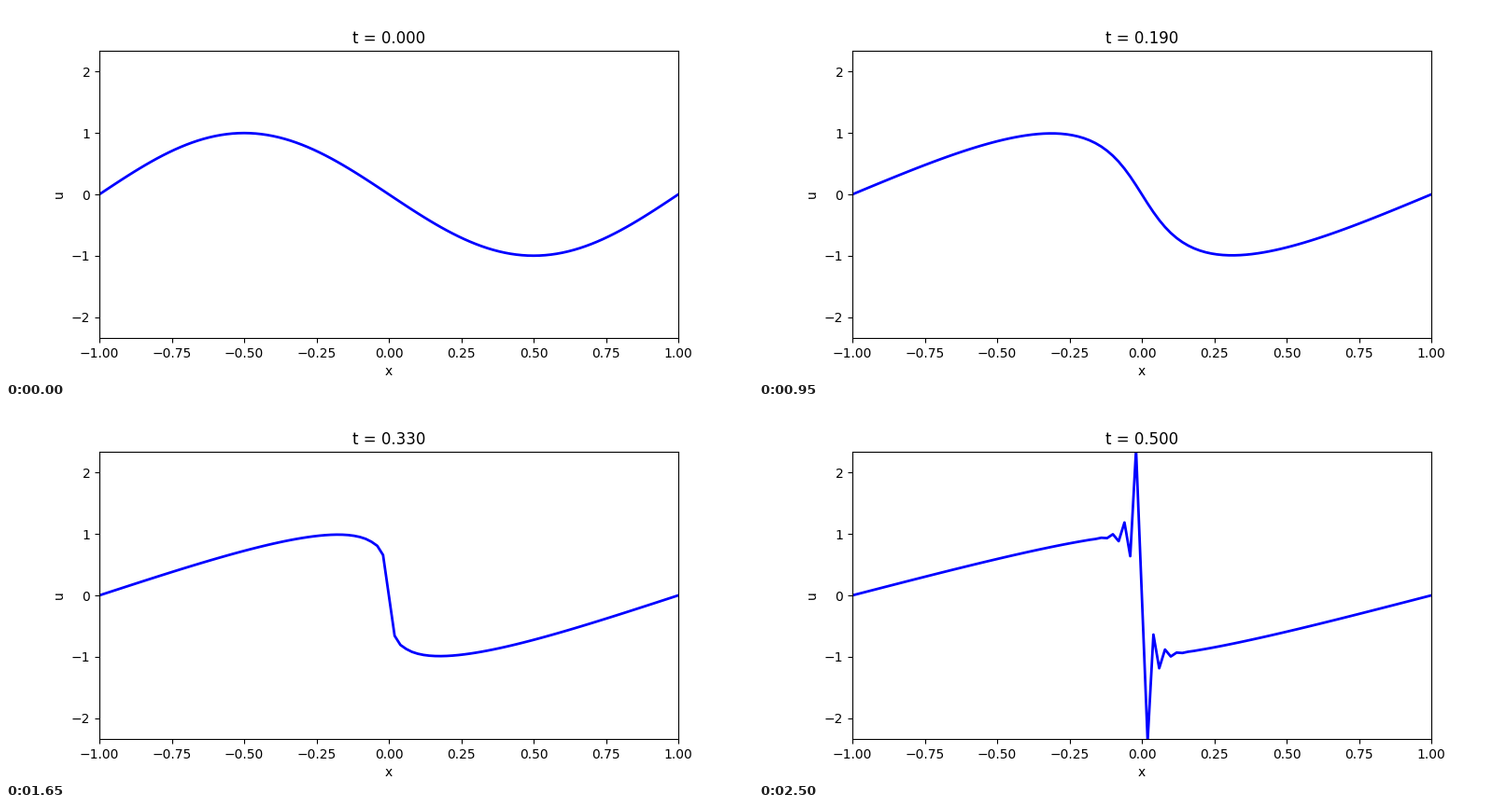
A matplotlib script for the animation above (2.55 s loop, 800 by 400 pixels).

```python
import numpy as np
import matplotlib.pyplot as plt
from matplotlib.animation import FuncAnimation

# Viscous Burgers equation, central differences, fixed zero ends
NU = 0.01 / np.pi
FRAMES = 51
FRAME_DT = 0.01
SUBSTEPS = 10
Y_MAX = 2.342

x = np.linspace(-1, 1, 101)
dx = x[1] - x[0]


def rate(u):
    du = np.zeros_like(u)
    slope = (u[2:] - u[:-2]) / (2 * dx)
    bend = (u[2:] - 2 * u[1:-1] + u[:-2]) / dx**2
    du[1:-1] = NU * bend - u[1:-1] * slope
    return du


def rk4_step(u, h):
    k1 = rate(u)
    k2 = rate(u + h / 2 * k1)
    k3 = rate(u + h / 2 * k2)
    k4 = rate(u + h * k3)
    return u + h / 6 * (k1 + 2 * k2 + 2 * k3 + k4)


def solve():
    u = -np.sin(np.pi * x)
    u[[0, -1]] = 0
    history = [u]
    for _ in range(FRAMES - 1):
        for _ in range(SUBSTEPS):
            u = rk4_step(u, FRAME_DT / SUBSTEPS)
        history.append(u)
    return history


history = solve()

fig, ax = plt.subplots(figsize=(8, 4), dpi=100)
line, = ax.plot(x, history[0], "b-", lw=2)
ax.set_xlim(-1, 1)
ax.set_ylim(-Y_MAX, Y_MAX)
ax.set_xlabel("x")
ax.set_ylabel("u")
title = ax.set_title("t = 0.000")


def update(i):
    line.set_ydata(history[i])
    title.set_text(f"t = {i * FRAME_DT:.3f}")
    return line, title


anim = FuncAnimation(fig, update, frames=FRAMES, interval=50,
                     repeat=True, repeat_delay=0, blit=False)
plt.show()
```
